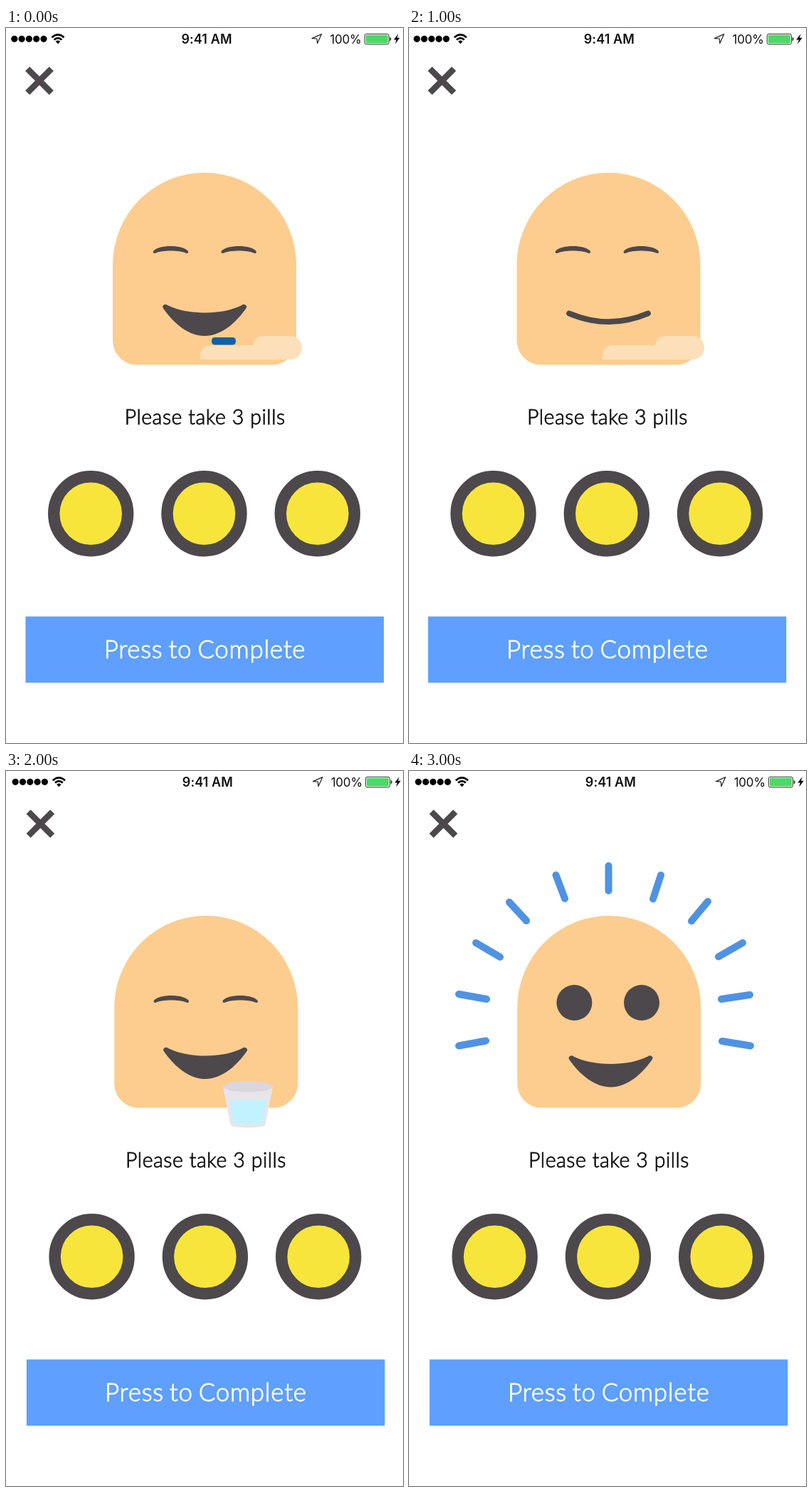
Animation, 558 px wide and 1003 px high, one loop 3500 ms. Source, as an HTML page:

```html
<!DOCTYPE html>
<html lang="en">
<head>
<meta charset="utf-8">
<title>Pill reminder</title>
<style>
  html, body { margin: 0; width: 100%; height: 100%; overflow: hidden; background: #fff; }
  svg { display: block; width: 100%; height: 100%; }
  .status { font: 17px Inter, sans-serif; letter-spacing: -.2px; fill: #111; }
  .time { font-size: 18px; font-weight: 600; letter-spacing: .1px; }
  .caption { font: 300 28.5px Lato, sans-serif; letter-spacing: .5px; word-spacing: .2px; fill: #111; stroke: #111; stroke-width: .8; }
  .label { font: 300 35px Lato, sans-serif; letter-spacing: .7px; word-spacing: -2.2px; fill: #fff; stroke: #fff; stroke-width: .9; }
  .dark { fill: #4d484b; }
  .skin { fill: #fddfb9; }
  .line { fill: none; stroke: #4d484b; }
</style>
</head>
<body>
<svg viewBox="0 0 558 1003" preserveAspectRatio="none">
  <defs>
    <path id="brow" class="dark" d="M-24.5 2C-17.5 -7.5 17.5 -7.5 24.5 2Q25.5 5.8 21.5 4.8C11.5 .5 -11.5 .5 -21.5 4.8Q-25.5 5.8 -24.5 2Z"/>
    <circle id="dot" class="dark" r="25"/>
  </defs>

  <g id="screen">
    <g id="signal" fill="#000"></g>
    <g fill="none" stroke="#000" stroke-width="2.7">
      <path d="M64.4 13.2Q73 5.4 81.6 13.2"/>
      <path d="M67.6 16.6Q73 11.6 78.4 16.6"/>
    </g>
    <path d="M69.8 18.8Q73 16 76.2 18.8L73 22.2Z"/>
    <text class="status time" x="282" y="22" text-anchor="middle">9:41 AM</text>
    <path d="M430 14.6L443.5 8.6L437.6 21.6L437 15Z" fill="none" stroke="#222" stroke-width="1.2" stroke-linejoin="round"/>
    <text class="status" x="499.5" y="22" text-anchor="end">100%</text>
    <rect x="504" y="8.3" width="34.2" height="14.6" rx="2.6" fill="#fff" stroke="#333" stroke-width="1"/>
    <rect x="505.5" y="9.8" width="31.2" height="11.6" rx="1.4" fill="#4cd964"/>
    <path d="M539.3 12.8Q541.4 13.3 541.4 15.6T539.3 18.4Z" fill="#333"/>
    <path d="M551.4 8L545 16.4H548.6L546.8 22.6L553.4 13.8H549.6Z"/>
    <path class="line" stroke-width="8.6" d="M30.2 57.2L63.8 90.8M63.8 57.2L30.2 90.8"/>

    <text class="caption" x="279.6" y="556" text-anchor="middle">Please take 3 pills</text>
    <g id="pills" fill="#f8e53b" stroke="#4d484b" stroke-width="16.4"></g>
    <rect x="27.5" y="825.5" width="503.5" height="93" fill="#5e9fff"/>
    <text class="label" x="279.5" y="884" text-anchor="middle">Press to Complete</text>
  </g>

  <path id="head" fill="#fccd8f" d="M-129 332A129 129 0 0 1 129 332V438.5A34 34 0 0 1 95 472.5H-95A34 34 0 0 1 -129 438.5Z"/>
  <use id="eyeL"/>
  <use id="eyeR"/>

  <g id="laugh"><path class="dark" d="M-58 -21Q-55 -23.5 -52 -21C-24 -7 24 -7 52 -21Q55 -23.5 58 -21Q60.5 -19 57 -15C41 7 21 22 0 22C-21 22 -41 7 -57 -15Q-60.5 -19 -58 -21Z"/></g>
  <g id="smile"><path class="line" stroke-width="7.8" stroke-linecap="round" d="M-55.5 0Q0 23.5 55.5 0"/></g>
  <g id="palm"><path class="skin" d="M273 465V459Q275 445 289 445H347Q349 432 363 432H399.5A16.5 16.5 0 0 1 399.5 465Z"/></g>
  <g id="fist"><path class="skin" d="M270.5 486V459C270.5 430 293 408 320 408H344.5V402Q344.5 388 358 388H391A23 23 0 0 1 414 411V440C414 468 394 489 366 488.5Z"/></g>
  <g id="capsule"><rect x="289" y="434" width="34" height="10.6" rx="4.6" fill="#0d62a8"/></g>
  <g id="glass">
    <path fill="#e8e5ea" d="M305 443L315.5 496Q316 498 319 498.8Q340 502 361 498.8Q364 498 364.5 496L375 443Z"/>
    <ellipse cx="340" cy="442.7" rx="35" ry="7.7" fill="#d9d6dc"/>
    <path fill="#c3f2ff" d="M314 462.5Q340 460 366.5 462.5L361.5 494Q340 498 319.5 494Z"/>
  </g>
  <g id="drink">
    <path class="dark" d="M245 405Q246 398 278 398Q311 398 312 404V412H262V424Q246 418 245 405Z"/>
    <path fill="#d8d5db" d="M258.5 414Q260 407 289 407Q317 407 319 414L314.5 451.5Q313 461 288.5 461Q264 461 262.5 451.5Z"/>
    <ellipse cx="288.5" cy="451.5" rx="26" ry="9.6" fill="#e9e6eb"/>
  </g>
  <g id="rays" stroke="#4f92e4" stroke-width="10" stroke-linecap="round">
    <path d="M280.5 133V168M206.5 146L219 179M141 184L165 210M94 241L128 261M70 313L109 320M70 385.5L108 378.5M354 146L343 179.5M420 183L397 210.5M469 241L435 260.5M479 314L439 320M480 385.5L440 379"/>
  </g>
</svg>
<script>
const HOLD = 500;
const $ = id => document.getElementById(id);

// drift: sideways shift of the screen; eyes: [shape, left x, right x, y]; each part: its offset
const poses = [
  { drift: 0, head: 279, eyes: ['brow', 231.5, 327.2, 311], laugh: [279.2, 410], palm: [0, 0], capsule: [0, 0] },
  { drift: -1.4, head: 277.6, eyes: ['brow', 229.8, 325.7, 311], laugh: [277.7, 410], fist: [0, 0] },
  { drift: -.7, head: 280.5, eyes: ['brow', 230.4, 326.3, 311], smile: [280.5, 400.4], palm: [-1, 0] },
  { drift: 1.4, head: 281.2, eyes: ['dot', 233.5, 328.2, 312.4], smile: [280.2, 390.4] },
  { drift: 1.4, head: 281.2, eyes: ['brow', 232.3, 329.2, 320], laugh: [280.1, 410], glass: [0, 0] },
  { drift: .7, head: 280.6, eyes: ['brow', 233.7, 329.7, 320], drink: [0, 0] },
  { drift: 1.4, head: 281.2, eyes: ['dot', 232.4, 327, 325], laugh: [283.5, 421.5], rays: [0, 0] }
];
const parts = ['laugh', 'smile', 'palm', 'fist', 'capsule', 'glass', 'drink', 'rays'];

const row = (n, x, step, y, r) => Array.from({ length: n }, (_, i) =>
  `<circle cx="${x + i * step}" cy="${y}" r="${r}"/>`).join('');
$('signal').innerHTML = row(5, 11.8, 10.3, 15.3, 4.6);
$('pills').innerHTML = row(3, 119.2, 159.3, 681.2, 52);

const move = (el, x, y) => el.setAttribute('transform', `translate(${x} ${y})`);

function draw(time) {
  const pose = poses[Math.floor(time / HOLD) % poses.length];
  const [eye, left, right, y] = pose.eyes;
  move($('screen'), pose.drift, 0);
  move($('head'), pose.head, 0);
  for (const [id, x] of [['eyeL', left], ['eyeR', right]]) {
    $(id).setAttribute('href', '#' + eye);
    move($(id), x, y);
  }
  for (const id of parts) {
    const at = pose[id];
    $(id).style.display = at ? '' : 'none';
    if (at) move($(id), ...at);
  }
}

const start = performance.now();
function tick() {
  draw(performance.now() - start);
  requestAnimationFrame(tick);
}
tick();
</script>
</body>
</html>
```
